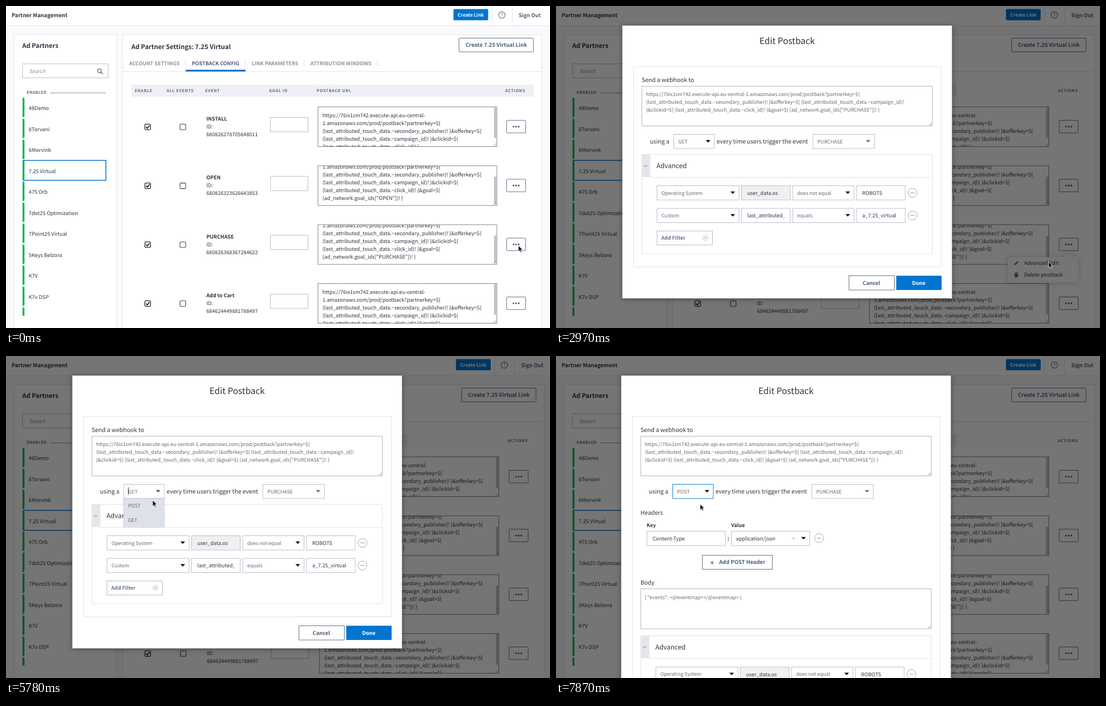
Recreate the animation shown at these times as an HTML page. Size 972x576 px, loop 8 s.

```html
<!DOCTYPE html>
<html lang="en">
<head>
<meta charset="utf-8">
<title>Edit Postback</title>
<style>
html,body{margin:0;width:100%;height:100%;overflow:hidden;background:#fff}
svg{display:block}
text{font-family:"Noto Sans CJK JP","Noto Sans CJK SC","Noto Sans CJK KR","Noto Sans CJK TC","Noto Sans CJK",sans-serif;fill:#2e343e;text-rendering:geometricPrecision}
.b{font-weight:700}
.w{fill:#fff}
.slate{fill:#4c5c75}
.soft{fill:#66748a}
.tab{fill:#8793a4}
.th{fill:#5a687c;letter-spacing:.75px}
.lab{fill:#5a687c;letter-spacing:.4px}
.thin{fill:#64686f}
.hint{fill:#8a929c;font-style:italic}
.mid{text-anchor:middle}
.panel{fill:#fff;stroke:#e3e4e9}
.field{fill:#fff;stroke:#b9c1cc}
.off{fill:#f0f0f3;stroke:#b9c1cc}
.area{fill:#fff;stroke:#85878b}
.note{fill:#fff;stroke:#b4b7bc}
.btn{fill:#fff;stroke:#66758b}
.blue{fill:#0075d0}
.line{stroke:#e3e4e9;fill:none}
.icon{stroke:#5a687c;fill:none}
.pale{stroke:#97a1af;fill:none}
.modal{fill:#fff;filter:drop-shadow(0 1px 5px rgba(0,0,0,.4))}
.pop{filter:drop-shadow(0 1px 5px rgba(40,50,70,.22))}

.an{animation:8s step-end infinite}
.plain{animation-name:plain}
.dim{animation-name:dim}
.menu{animation-name:menu}
.menuHot{animation-name:menuHot}
.menuDim{animation-name:menuDim}
.get{animation-name:get}
.post{animation-name:post}
.ring{animation-name:ring}
.drop{animation-name:drop}
.dropHot{animation-name:dropHot}
.caret{animation-name:caret}
.hand{animation-name:hand}
.arrow{animation-name:arrow}
.tri{animation-name:tri}
.focus{animation-name:focus}
.ptr{animation-name:move}
@keyframes plain{0%{opacity:1}37.125%{opacity:0}}
@keyframes dim{0%{opacity:0}37.125%{opacity:1}}
@keyframes menu{0%{opacity:0}20.5%{opacity:1}37.125%{opacity:0}}
@keyframes menuHot{0%{opacity:0}28%{opacity:1}}
@keyframes menuDim{0%{opacity:1}68.5%{opacity:0}}
@keyframes get{0%{opacity:0}37.125%{opacity:1}87.25%{opacity:0}}
@keyframes post{0%{opacity:0}87.25%{opacity:1}}
@keyframes ring{0%{opacity:0}5.625%{opacity:1}7.5%{opacity:0}18.625%{opacity:1}20.5%{opacity:0}35.25%{opacity:1}37.125%{opacity:0}66.625%{opacity:1}68.5%{opacity:0}}
@keyframes drop{0%{opacity:0}68.5%{opacity:1}}
@keyframes dropHot{0%{opacity:0}72.25%{opacity:1}}
@keyframes caret{0%{opacity:0}68.5%{opacity:1}74.125%{opacity:0}79.75%{opacity:1}85.375%{opacity:0}}
@keyframes hand{0%{opacity:0}59.125%{opacity:1}72.25%{opacity:0}}
@keyframes arrow{0%{opacity:1}59.125%{opacity:0}72.25%{opacity:1}}
@keyframes tri{0%{fill:#111}57.25%{fill:#5c5f66}}
@keyframes focus{0%{stroke:#9aa5b3}89%{stroke:#1484dc}}
@keyframes move{
 0%{transform:translate(915.5px,428.5px)}
 24.25%{transform:translate(912px,432px)}
 26.125%{transform:translate(900px,443px)}
 28%{transform:translate(884px,455px)}
 29.75%{transform:translate(880px,457.5px)}
 44.5%{transform:translate(868px,453.3px)}
 46.375%{transform:translate(807px,432.4px)}
 48.125%{transform:translate(686px,390.5px)}
 50%{transform:translate(528.5px,336px)}
 51.875%{transform:translate(395px,290px)}
 53.625%{transform:translate(322.5px,264.8px)}
 55.5%{transform:translate(286px,252.2px)}
 57.25%{transform:translate(274px,248px)}
 72.25%{transform:translate(262px,258px)}
 74.125%{transform:translate(254px,264.8px)}
 98.375%{transform:translate(257.5px,264.8px)}
}
</style>
</head>
<body>
<svg id="stage" width="972" height="576" viewBox="0 0 972 576"></svg>
<script>
const esc = s => s.replace(/&/g, '&amp;').replace(/</g, '&lt;').replace(/>/g, '&gt;');
const text = (x, y, s, cls = '', size = 9.2) =>
  `<text x="${x}" y="${y}" class="${cls}" font-size="${size}">${esc(s)}</text>`;
const rect = (x, y, w, h, cls, more = '') =>
  `<rect x="${x}" y="${y}" width="${w}" height="${h}" class="${cls}" ${more}/>`;
const path = (d, more) => `<path d="${d}" ${more}/>`;
const line = (x1, y1, x2, y2) => path(`M${x1} ${y1}L${x2} ${y2}`, 'class="line"');
const group = (cls, body, shift) =>
  `<g class="${cls}"${shift ? ` transform="translate(${shift})"` : ''}>${body}</g>`;
const grip = (x, y) => path(`M${x - 6} ${y - 1}l5-5M${x - 3} ${y - 1}l2-2`, 'stroke="#777" stroke-width=".8"');

const brand = '7.25 Virtual';
const partners = ['48Demo', '8Torvani', '6Morvink', brand, '475 Orb', '7dot25 Optimization',
  '7Point25 Virtual', '5Keys Belzora', 'K7V', 'K7v DSP'];
const events = [
  ['INSTALL', '680826278705648011', 0],
  ['OPEN', '680826323626643853', 28],
  ['PURCHASE', '680826368367284622', 28],
  ['Add to Cart', '684624449881788497', 0]
];
const touch = '(last_attributed_touch_data.~';
const urlLines = (name, i) => [
  'https://76ix1sm742.execute-api.eu-central-',
  '1.amazonaws.com/prod/postback?partnerkey=${',
  touch + 'secondary_publisher)! }&offerkey=${',
  touch + 'campaign_id)! }&clickid=${',
  touch + 'click_id)! }' + (i ? '&goal=${' : ''),
  `(ad_network.goal_ids["${name}"])! }`
];

function header(d) {
  return rect(0, 0, 972, 576, '', 'fill="#fafafc"') + rect(0, 0, 972, 35, '', 'fill="#fff"') +
    line(0, 35.5, 972, 35.5) + line(868.5 + d, 0, 868.5 + d, 35) + line(904.5 + d, 0, 904.5 + d, 35) +
    text(10, 20, 'Partner Management', 'b', 9.6) +
    rect(799.5 + d, 5.5, 62, 20, 'blue', 'rx="1.5"') +
    text(830.5 + d, 19, 'Create Link', 'b w mid', 8.45) +
    `<circle cx="${886 + d}" cy="16" r="5.8" class="icon" stroke-width="1.1"/>` +
    text(886 + d, 19.2, '?', 'slate mid', 8.6) +
    text(916 + d, 20, 'Sign Out', 'b slate', 9.4);
}

function sidebar() {
  const bar = (y, h) => path(`M29.5 ${y}l3.5 1.5v${h - 3}l-3.5 1.5z`, 'fill="#1db45e"');
  const item = (s, i) => bar(163.5 + 37.5 * i, 36) +
    (i === 3 ? path('M33 276.2H178.5V311.7H33', 'fill="none" stroke="#0a78d1" stroke-width="1.6"') +
      path('M30 276.2h4M30 311.7h4', 'stroke="#0a78d1" stroke-width="1.6"') : '') +
    text(40.5, 186 + 37.5 * i, s, '', 9.25);
  return rect(14.5, 51.5, 183, 540, 'panel') +
    text(29, 74.5, 'Ad Partners', 'b', 11.25) +
    rect(29.5, 103.5, 153, 25, 'field') + text(41, 119.5, 'Search', 'hint', 9.2) +
    '<circle cx="167" cy="116" r="3.4" class="icon" stroke-width="1.3"/>' +
    path('M169.6 118.6l3.2 3.2', 'class="icon" stroke-width="1.6"') +
    text(37, 157.3, 'ENABLED', 'b lab', 7.1) + path('M79 155.5H178', 'stroke="#8c97a6"') +
    partners.map(item).join('') + path('M29.5 538.5l3.5 1.5v14h-3.5z', 'fill="#1db45e"');
}

function row([name, id, scroll], i, d) {
  const top = 180 + 105.33 * i, mid = top + 36.3;
  const ax = 557.5 + d * .6, aw = 319.5 + d * .2, bx = 894.5 + d, ex = 358 + d * .25;
  const box = x => `x="${x}" y="${mid - 5}" width="10" height="10" rx="1.5"`;
  const lines = urlLines(name, i)
    .map((s, n) => text(8, 18.3 + 14 * n - scroll, s, '', 9.18)).join('');
  return `<rect ${box(248.2)} fill="#fff" stroke="#23272e" stroke-width="1.3"/>` +
    path(`M250.2 ${mid}l2.2 2.5 4-5`, 'fill="none" stroke="#23272e" stroke-width="1.8"') +
    `<rect ${box(311 + d * .15)} fill="#fff" stroke="#3a3f47" stroke-width="1.1"/>` +
    text(ex, top + 25, name, 'b', 9.1) + text(ex, top + 39, 'ID:') + text(ex, top + 53, id) +
    rect(472.5 + d * .35, top + 19.5, 67, 25.5, 'field') +
    rect(ax, top + .5, aw, 71, 'area') +
    `<svg x="${ax}" y="${top + 1}" width="${aw - 1}" height="70">${lines}</svg>` +
    rect(ax + aw - 5, top + (scroll ? 20 : 1.5), 4.2, scroll ? 48.5 : 54.5, '', 'fill="#c0c3cb"') +
    grip(ax + aw, top + 71.5) +
    rect(bx, top + 24.5, 34, 22.5, 'btn', 'rx="1"') +
    [12.4, 17, 21.6].map(x => `<circle cx="${bx + x}" cy="${top + 35.8}" r="1.55" class="slate"/>`).join('');
}

function page(d) {
  const tabs = [[220, 'ACCOUNT SETTINGS', 'tab'], [332, 'POSTBACK CONFIG', 'slate'],
    [439, 'LINK PARAMETERS', 'tab'], [544, 'ATTRIBUTION WINDOWS', 'tab']];
  const heads = [[230, 'ENABLE', 0], [287, 'ALL EVENTS', .15], [356, 'EVENT', .25],
    [470, 'GOAL ID', .35], [555, 'POSTBACK URL', .6], [892, 'ACTIONS', 1]];
  return header(d) + sidebar() + rect(208.5, 51.5, 749 + d, 540, 'panel') +
    text(224, 77, 'Ad Partner Settings: ' + brand, 'b', 11.3) +
    rect(809.5 + d, 57.5, 133, 24.5, 'btn', 'rx="1"') +
    text(876 + d, 73.3, `Create ${brand} Link`, 'b slate mid', 9.65) +
    line(209, 117.5, 957 + d, 117.5) +
    [320.5, 427.5, 532.5, 663.5].map(x => line(x, 97, x, 108)).join('') +
    rect(321, 114, 107, 3.2, 'blue') +
    tabs.map(([x, s, c]) => text(x, 106.3, s, 'b ' + c, 9.12)).join('') +
    rect(224, 140.5, d ? 493 : 719, 22, '', 'fill="#eef0f5"') +
    heads.map(([x, s, k]) => text(x + d * k, 154, s, 'b th', 7.06)).join('') +
    events.map((e, i) => row(e, i, d)).join('');
}

function menu(hot) {
  return `<g class="pop">${rect(803, 449, 126, 45.5, 'w', 'rx="1.5"')}${path('M904 449.5l8-8 8 8z', 'fill="#fff"')}</g>` +
    (hot ? rect(803, 449, 126, 21.5, 'an menuHot', 'fill="#d9dde3"') : '') +
    path('M814.2 463.8l.7-2.5 4.6-4.6 1.8 1.8-4.6 4.6zM820 456.2l.8-.8 1.8 1.8-.8.8z', 'fill="#5a6474"') +
    path('M814.5 477.5h2l.6-.9h2l.6.9h2v1.1h-7.2zM815 479.3h6.2l-.4 6h-5.4z', 'fill="#5a6474"') +
    text(832, 463, 'Advanced Edit', '', 9.25) + text(832, 484.3, 'Delete postback', '', 9.25);
}

const tri = (x, y, cls, fill = '#111') => path(`M${x} ${y}h8.4l-4.2 4.6z`, `class="${cls}" fill="${fill}"`);
const select = (x, y, w, s, opt = {}) =>
  rect(x, y, w, 25.5, 'field ' + (opt.box || '')) + text(x + 8, y + 16.2, s, opt.text || 'thin', opt.size || 8.85) +
  tri(x + w - 15.4, y + 10.2, opt.tri || '', opt.fill);
const input = (x, y, w, s, cls = 'field') => rect(x, y, w, 25.5, cls) +
  `<svg x="${x}" y="${y}" width="${w - 10}" height="25">${text(10.3, 16.4, s, '', 9.15)}</svg>`;
const minus = (x, y) => `<circle cx="${x}" cy="${y}" r="8" class="pale" stroke-width=".9"/>` +
  path(`M${x - 4} ${y}h8`, 'class="pale" stroke-width="1.1"');

function modalTop(h, inner, method) {
  return rect(118.5, 35, 589, h, 'modal') + text(413, 67.6, 'Edit Postback', 'mid', 15.6) +
    rect(138.5, 108.5, 550, inner, 'panel') + text(153, 135.6, 'Send a webhook to', '', 10.5) +
    rect(153.5, 143.5, 519, 71, 'note') + grip(672.5, 214.5) +
    ['https://76ix1sm742.execute-api.eu-central-1.amazonaws.com/prod/postback?partnerkey=${',
      touch + 'secondary_publisher)! }&offerkey=${ ' + touch + 'campaign_id)!',
      '}&clickid=${ ' + touch + 'click_id)! }&goal=${ (ad_network.goal_ids["PURCHASE"])! }'
    ].map((s, i) => text(161, 161.4 + 14 * i, s, 'thin', 8.88)).join('') +
    text(168, 246, 'using a', '', 10.45) + method +
    text(287, 246, 'every time users trigger the event', '', 10.5) +
    select(459, 229.5, 110, 'PURCHASE', { fill: '#777' });
}

function advanced() {
  return rect(153.5, 265.5, 519, 177.5, 'panel') + rect(153.5, 265.5, 15, 40.5, '', 'fill="#e5e6ea"') +
    line(168, 306.5, 672, 306.5) +
    path('M157.3 284.8l2.8 2.8 2.8-2.8', 'class="icon" stroke-width="1"') +
    text(179.5, 290.2, 'Advanced', '', 11.9) +
    [[321.5, 'Operating System', 'user_data.os', 'off', 'does not equal', 'ROBOTS'],
      [362, 'Custom', 'last_attributed_touch', 'field', 'equals', 'a_7.25_virtual']
    ].map(([y, a, b, c, op, v]) => select(180.5, y, 146.5, a) + input(331.5, y, 87, b, c) +
      select(423, y, 109.5, op) + input(537, y, 87, v) + minus(637, y + 12.8)).join('') +
    rect(180.5, 402.5, 99, 25, '', 'fill="#fff" stroke="#7d899a" stroke-dasharray="2 1.5"') +
    text(188, 418.3, 'Add Filter', 'b soft', 9.05) +
    '<circle cx="267" cy="414.5" r="4.6" class="pale" stroke-width=".6"/>' +
    path('M264.5 414.5h5M267 412v5', 'class="pale" stroke-width=".8"');
}

const dropdown = rect(210.5, 254.5, 72.5, 51.5, '', 'fill="#fff" stroke="#c3c8d0"') +
  rect(211, 280, 72, 25.5, '', 'fill="#dde1e9"') +
  rect(211, 255, 72, 25.5, 'an dropHot', 'fill="#dde1e9"') +
  text(218, 271, 'POST', 'thin', 8.85) + text(218, 296.5, 'GET', 'thin', 8.85);

const getModal = modalTop(488, 358, select(210.5, 229.5, 72.5, 'GET', { tri: 'an tri' })) + advanced() +
  rect(523.5, 482.5, 81, 25.5, 'btn') + text(563.5, 498.7, 'Cancel', 'b slate mid', 9.4) +
  rect(608, 482.5, 81, 25.5, 'blue') + text(648.3, 498.7, 'Done', 'b w mid', 9.4) +
  group('an drop', dropdown) + rect(218, 235, 1, 13, 'an caret', 'fill="#333"');

const postModal =
  modalTop(600, 520, select(210.5, 229.5, 72.5, 'POST', { box: 'an focus' })) +
  text(153, 284.2, 'Headers', '', 10.4) + text(164, 305.8, 'Key', 'b', 9) + text(315, 305.8, 'Value', 'b', 9) +
  input(164.5, 313.5, 140, 'Content-Type') + text(308.3, 329.5, ':', 'b', 10) +
  select(315.5, 313.5, 140, 'application/json', { text: 'std', size: 9.2 }) +
  path('M424.5 324.2l4 4m0-4l-4 4', 'stroke="#999" stroke-width=".8"') + minus(472, 325.8) +
  rect(263.5, 356.5, 125, 25, 'btn') + path('M277.7 369.7h6.6M281 366.4v6.6', 'class="icon" stroke-width="1.3"') +
  text(293.5, 372.3, 'Add POST Header', 'b slate', 9.55) +
  text(153, 409, 'Body', '', 10.4) + rect(153.5, 416.5, 519, 71.5, 'note') + grip(672.5, 488) +
  text(160.5, 435, '{ "events": <@eventmap></@eventmap> }', 'thin', 8.85) +
  group('', advanced(), '0 234.8');

const pointer = `<circle cx="1.3" cy="-.3" r="7.6" class="an ring" fill="rgba(255,255,255,.4)" stroke="#222"/>` +
  path('M0 0V10.7L2.5 8.4 4.2 12.2 6.1 11.4 4.4 7.7H7.7Z', 'class="an arrow" fill="#000" stroke="#fff" stroke-width=".8"') +
  path('M-1.2 .8Q-1.2-.4 0-.4Q1.2-.4 1.2 .8V4Q2.2 3.4 3.2 4.2Q4.4 3.8 5.2 4.8Q6.6 4.6 7 6V8.5Q6.8 10.5 6 12H.6Q-.6 10-2.8 7.6Q-3.6 6.4-2.4 6Q-1.8 6-1.2 6.8ZM1.2 4V6.5M3.2 4.2V6.5M5.2 4.8V6.6',
    'class="an hand" fill="#fff" stroke="#000" stroke-width="1"');

document.getElementById('stage').innerHTML =
  group('an plain', page(0)) + group('an menu', menu(true)) +
  group('an dim', page(4.5) + group('', group('an menuDim', menu(false)), '4.5 0') +
    rect(0, 0, 972, 576, '', 'fill="#000" fill-opacity=".54"')) +
  group('an get', getModal) + group('', group('an post', postModal), '-2 0') +
  group('an ptr', pointer);
</script>
</body>
</html>
```
